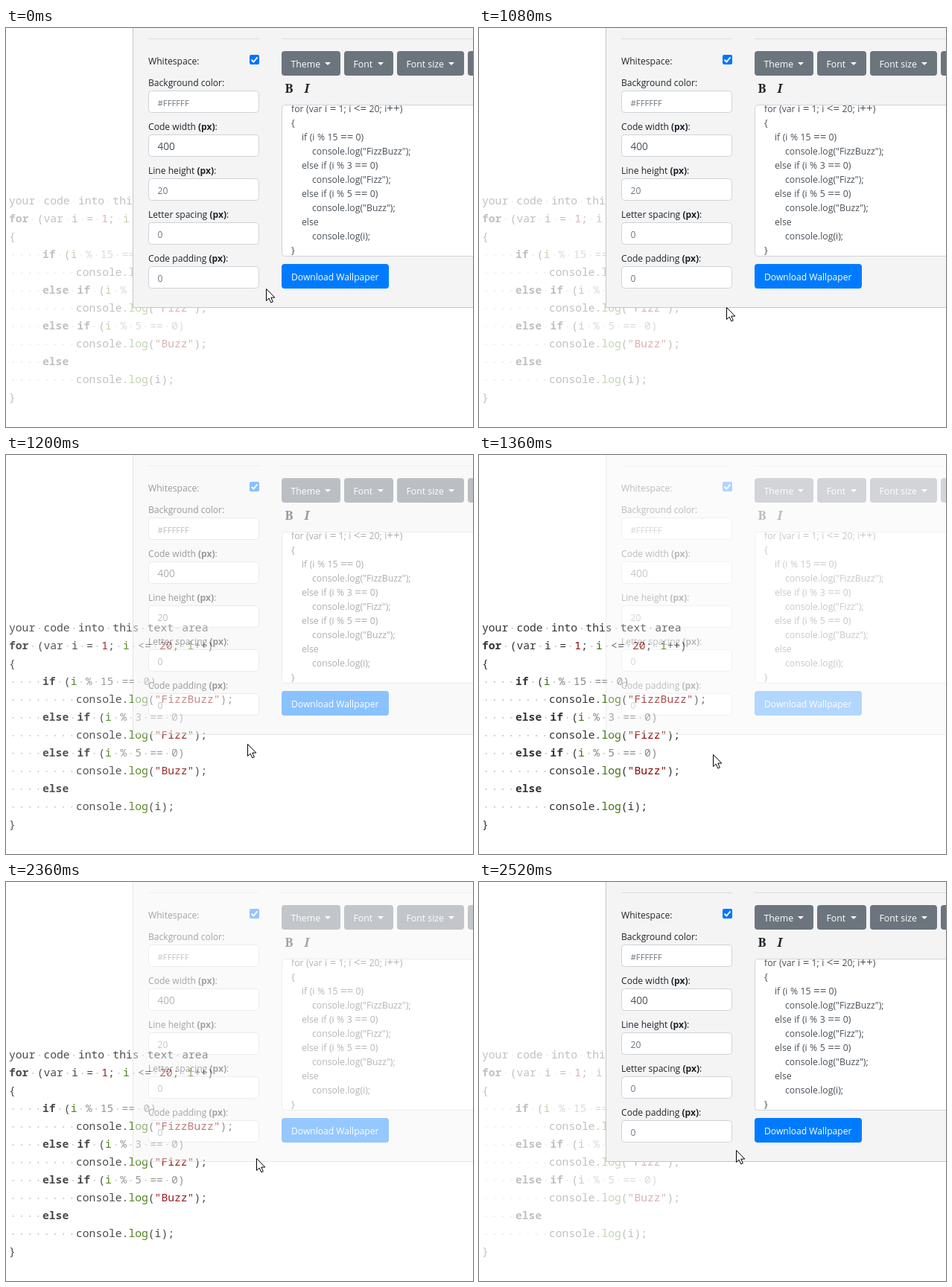
Write an HTML page with a canvas that moves like this. It is 627 px wide and 536 px high and loops after 3.04 s.

```html
<!DOCTYPE html>
<html lang="en">
<head>
<meta charset="utf-8">
<title>Code wallpaper panel</title>
<style>
html, body { margin: 0; width: 100%; height: 100%; overflow: hidden; background: #fff; }
canvas { display: block; width: 627px; height: 536px; }
</style>
</head>
<body>
<canvas id="stage"></canvas>
<script>
const W = 627, H = 536, LOOP = 3040, STEP = 40;
const dpr = window.devicePixelRatio || 1;
const SANS = '"Open Sans", "Noto Sans", sans-serif';
const SERIF = '"Noto Serif", serif';
const MONO = '"Noto Sans Mono", "DejaVu Sans Mono", monospace';
const INK = '#212529', MUTED = '#6c757d', FIELD = '#495057', EDGE = '#ced4da';

function layer(canvas) {
  canvas.width = W * dpr;
  canvas.height = H * dpr;
  const g = canvas.getContext('2d');
  g.scale(dpr, dpr);
  return g;
}
const newLayer = () => layer(document.createElement('canvas'));

function text(g, str, x, y, size, color, weight = 400, family = SANS) {
  g.font = `${weight} ${size}px ${family}`;
  g.fillStyle = color;
  g.fillText(str, x, y);
  return x + g.measureText(str).width;
}

function box(g, x, y, w, h, fill, edge, r = 4) {
  g.beginPath();
  if (edge) g.roundRect(x + 0.5, y + 0.5, w - 1, h - 1, r);
  else g.roundRect(x, y, w, h, r);
  g.fillStyle = fill;
  g.fill();
  if (edge) {
    g.lineWidth = 1;
    g.strokeStyle = edge;
    g.stroke();
  }
}

// Highlighted code: k keyword, g built-in, r literal, c comment, t plain
const COLORS = { k: '#333', g: '#397300', r: '#880000', c: '#888', t: '#333' };
const test = n => [['t', '('], ['g', 'i'], ['t', ' '], ['c', `% ${n} == 0)`]];
const ifLine = n => [['t', '    '], ['k', 'if'], ['t', ' '], ...test(n)];
const elseIf = n => [['t', '    '], ['k', 'else if'], ['t', ' '], ...test(n)];
const log = (style, arg) => [['t', '        console.'], ['g', 'log'], ['t', '('], [style, arg], ['t', ');']];
const CODE = [
  [['t', 'your code into this text area']],
  [['k', 'for'], ['t', ' (var i = '], ['r', '1'], ['t', '; '], ['g', 'i'], ['t', ' <= '],
   ['r', '20'], ['t', '; '], ['g', 'i'], ['t', '++)']],
  [['t', '{']],
  ifLine(15), log('r', '"FizzBuzz"'),
  elseIf(3), log('r', '"Fizz"'),
  elseIf(5), log('r', '"Buzz"'),
  [['t', '    '], ['k', 'else']],
  log('t', 'i'),
  [['t', '}']]
];

function drawCode(g) {
  const charW = 8.8, spaceW = 11.25;
  CODE.forEach((line, row) => {
    const y = 237 + row * 24;
    let x = 4;
    for (const [style, str] of line) {
      for (const ch of str) {
        if (ch === ' ') {
          g.fillStyle = '#c4c4c4';
          g.beginPath();
          g.arc(x + spaceW / 2, y - 4, 1.1, 0, 7);
          g.fill();
          x += spaceW;
        } else {
          text(g, ch, x, y, 14.66, COLORS[style], style === 'k' ? 700 : 400, MONO);
          x += charW;
        }
      }
    }
  });
}

function dropdown(g, label, x, w) {
  box(g, x, 31, w, 33, MUTED);
  text(g, label, x + 12.5, 52.5, 12.3, '#fff');
  const cx = x + w - 17;
  g.beginPath();
  g.moveTo(cx - 4, 46);
  g.lineTo(cx + 4, 46);
  g.lineTo(cx, 50);
  g.fill();
}

function field(g, label, unit, y, value, size, color) {
  let x = text(g, label, 191, y, 12.1, INK);
  if (unit) {
    x = text(g, ' (px)', x, y, 12.1, INK, 700);
    text(g, ':', x, y, 12.1, INK);
  }
  box(g, 191, y + 6, 149, 30, '#fff', EDGE);
  text(g, value, 203.5, y + 26.5, size, color);
}

// Plain code for the text area, with slightly larger operators
function plainLine(g, line, y) {
  const str = line.map(part => part[1]).join('');
  const src = str.trimStart();
  let x = 383 + (str.length - src.length) * 3.5;
  for (const part of src.split(/([=<+]+)/)) {
    x = text(g, part, x, y, /[=<+]/.test(part) ? 15.2 : 12.25, FIELD);
  }
}

function drawPanel(g) {
  g.fillStyle = '#f4f4f4';
  g.fillRect(170, 0, W - 170, 376);
  g.fillStyle = '#c6c6c6';
  g.fillRect(170, 0, 1, 376);
  g.fillRect(170, 375, W - 170, 1);
  g.fillStyle = '#dbdbdb';
  g.fillRect(191, 14, 149, 1);
  g.fillRect(370, 14, W - 370, 1);

  text(g, 'Whitespace:', 191, 49, 12.1, INK);
  box(g, 327, 36, 13, 13, '#0075ff', null, 2);
  g.beginPath();
  g.moveTo(329.5, 42.7);
  g.lineTo(332.3, 45.5);
  g.lineTo(337.5, 39.3);
  g.lineWidth = 1.9;
  g.strokeStyle = '#fff';
  g.stroke();

  field(g, 'Background color:', false, 78, '#FFFFFF', 11.3, MUTED);
  field(g, 'Code width', true, 137, '400', 13.6, FIELD);
  field(g, 'Line height', true, 196, '20', 12.1, MUTED);
  field(g, 'Letter spacing', true, 255, '0', 12.1, MUTED);
  field(g, 'Code padding', true, 314, '0', 12.1, MUTED);

  dropdown(g, 'Theme', 370, 79);
  dropdown(g, 'Font', 454, 66);
  dropdown(g, 'Font size', 525, 90);
  box(g, 620, 31, 40, 33, MUTED);
  text(g, 'B', 374.5, 87, 16.4, INK, 700, SERIF);
  text(g, 'I', 400.5, 87, 16.4, INK, 'italic 700', SERIF);

  box(g, 370, 103, 300, 204, '#fff', EDGE);
  g.save();
  g.beginPath();
  g.rect(371, 104, W, 202);
  g.clip();
  g.wordSpacing = '0.3px';
  CODE.slice(1).forEach((line, row) => plainLine(g, line, 113 + row * 19));
  g.restore();

  box(g, 370, 317, 144, 33, '#007bff');
  text(g, 'Download Wallpaper', 383, 338.5, 12.1, '#fff');
}

function drawCursor(g, x, y) {
  g.save();
  g.translate(x + 0.5, y + 0.5);
  g.beginPath();
  [[0, 0], [0, 16], [3.6, 12.6], [6.3, 18.4], [8.8, 17.3], [6.3, 11.6], [11.3, 11.6]]
    .forEach(p => g.lineTo(...p));
  g.closePath();
  g.fillStyle = '#fff';
  g.fill();
  g.lineWidth = 1;
  g.lineJoin = 'round';
  g.strokeStyle = '#000';
  g.stroke();
  g.restore();
}

// Pointer path: time, x, y
const PATH = [
  [0, 349, 350], [720, 349, 350], [760, 348, 351], [840, 348, 351],
  [1160, 327, 383], [1320, 314, 402], [2000, 314, 402], [2040, 316, 400],
  [2360, 336, 371], [2520, 345, 360], [LOOP, 345, 360]
];

function pointer(t) {
  const i = PATH.findIndex(p => p[0] > t);
  const [t0, x0, y0] = PATH[i - 1], [t1, x1, y1] = PATH[i];
  const k = (t - t0) / (t1 - t0);
  return [Math.round(x0 + (x1 - x0) * k), Math.round(y0 + (y1 - y0) * k)];
}

// CSS "ease": cubic-bezier(.25, .1, .25, 1)
function ease(p) {
  if (p <= 0) return 0;
  if (p >= 1) return 1;
  const curve = (s, a, b) => 3 * a * s * (1 - s) ** 2 + 3 * b * s * s * (1 - s) + s ** 3;
  let lo = 0, hi = 1;
  for (let n = 0; n < 24; n++) {
    const mid = (lo + hi) / 2;
    if (curve(mid, 0.25, 0.25) < p) lo = mid;
    else hi = mid;
  }
  return curve(lo, 0.1, 1);
}

const stage = layer(document.getElementById('stage'));
const code = newLayer(), panel = newLayer();
drawCode(code);
drawPanel(panel);

function blend(g, alpha) {
  stage.globalAlpha = alpha;
  stage.drawImage(g.canvas, 0, 0, W, H);
  stage.globalAlpha = 1;
}

function draw(now) {
  const t = Math.floor((now % LOOP) / STEP) * STEP;
  const away = ease((t - 1106) / 200) - ease((t - 2334) / 190);
  stage.fillStyle = '#fff';
  stage.fillRect(0, 0, W, H);
  blend(code, 0.3 + 0.7 * away);
  blend(panel, 1 - 0.7 * away);
  drawCursor(stage, ...pointer(t));
}

let start;
function tick(now) {
  start ??= now;
  draw(Math.max(0, now - start));
  requestAnimationFrame(tick);
}
draw(0);
requestAnimationFrame(tick);
</script>
</body>
</html>
```
